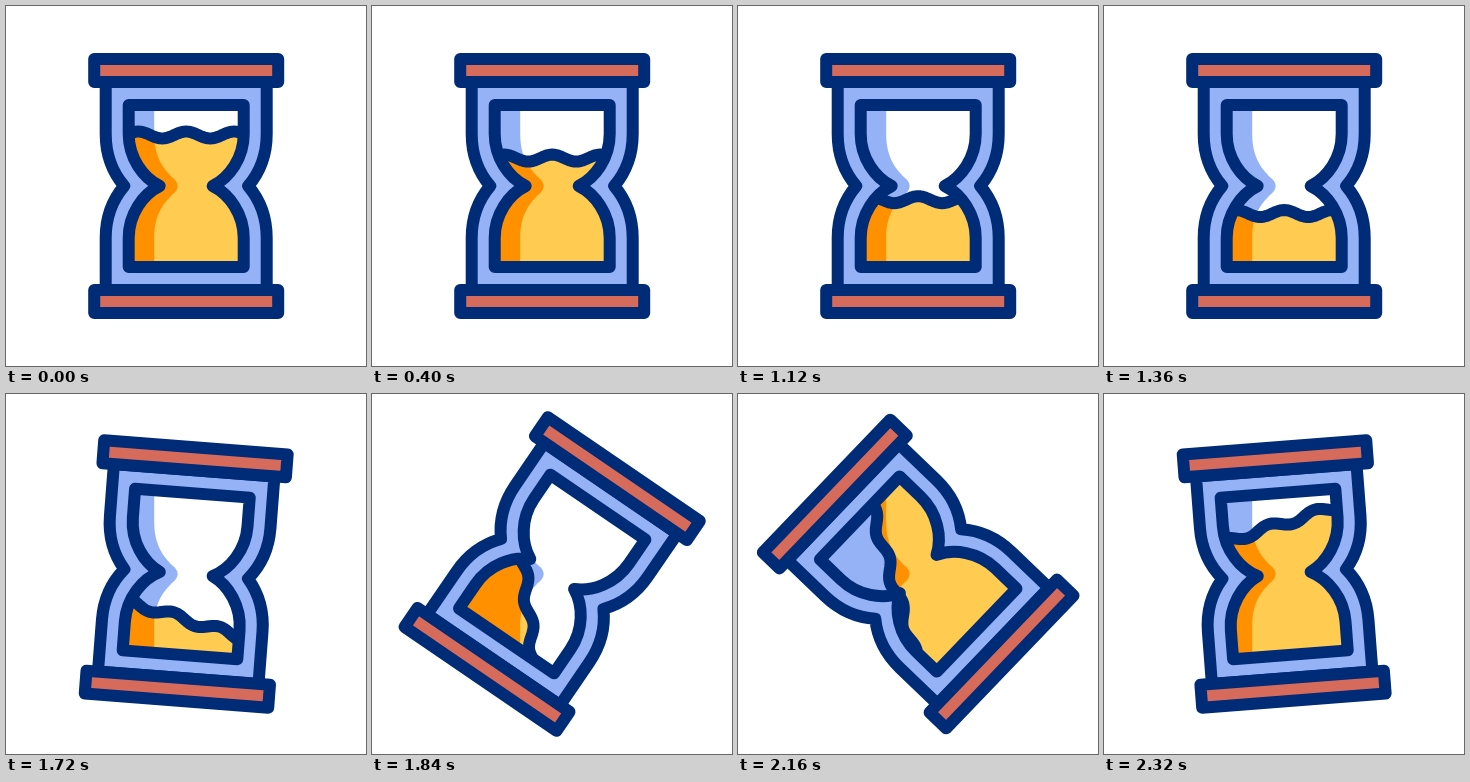
Write an HTML page with a canvas that moves like this. It is 360x360 px and loops after 2360 ms.

```html
<!DOCTYPE html>
<html lang="en">
<head>
<meta charset="utf-8">
<title>Hourglass</title>
<style>
  html, body { margin: 0; height: 100%; overflow: hidden; background: #fff; }
  canvas { display: block; }
</style>
</head>
<body>
<canvas id="stage" width="360" height="360"></canvas>
<script>
const ctx = document.getElementById('stage').getContext('2d');
const LOOP = 2360, FLOW = 1680, STEP = 40;
const NAVY = '#002b76', BLUE = '#94b2f5', RED = '#d66b5c', YELLOW = '#ffcb50', ORANGE = '#ff9100';
const FULL = -51, EMPTY = 46; // sand surface relative to the centre

// All shapes are centred on the origin.
const body = new Path2D(`M-80.5 -104V-52C-80.5 -30 -74 -14 -62 0C-74 14 -80.5 30 -80.5 52V104
  H80.5V52C80.5 30 74 14 62 0C74 -14 80.5 -30 80.5 -52V-104Z`);
const bulbs = new Path2D(`M-57.5 -81V-52C-57.5 -28 -43 -8 -26.5 0C-43 8 -57.5 28 -57.5 52V81
  H57.5V52C57.5 28 43 8 26.5 0C43 -8 57.5 -28 57.5 -52V-81Z`);
const shade = new Path2D(`M-200 -200H-32V-52C-32 -28 -22 -16 -11 -6Q-6 0 -11 6
  C-22 16 -32 28 -32 52V200H-200Z`);
const bars = new Path2D();
bars.rect(-92, -127, 184, 23);
bars.rect(-92, 104, 184, 23);

const wave = new Path2D();
for (let x = -168; x <= 168; x += 2) wave.lineTo(x, -3.5 * Math.cos(x * Math.PI / 24));
const sand = new Path2D(wave);
sand.lineTo(168, 300);
sand.lineTo(-168, 300);
sand.closePath();

// Timing curve cubic-bezier(.167, 0, .833, 1)
function ease(x) {
  let lo = 0, hi = 1;
  for (let i = 0; i < 24; i++) {
    const t = (lo + hi) / 2, u = 1 - t;
    if (.501 * u * u * t + 2.499 * u * t * t + t * t * t < x) lo = t; else hi = t;
  }
  return lo * lo * (3 - 2 * lo);
}

function fill(path, color) {
  ctx.fillStyle = color;
  ctx.fill(path);
}

function drawContents(turn, tilt, level) {
  ctx.save();
  ctx.rotate(turn);
  ctx.clip(bulbs);
  fill(bulbs, '#fff');
  ctx.rotate(-turn);
  fill(shade, BLUE); // the shade keeps still while the glass turns

  ctx.rotate(turn + tilt);
  ctx.translate(0, level);
  ctx.save();
  ctx.clip(sand);
  fill(sand, YELLOW);
  ctx.translate(0, -level);
  ctx.rotate(-turn - tilt);
  fill(shade, ORANGE);
  ctx.restore();
  ctx.stroke(wave);
  ctx.restore();
}

function draw(time) {
  const flow = Math.min(time / FLOW, 1);
  const p = Math.max(0, (time - FLOW) / (LOOP - FLOW));
  const flip = ease(p);
  const turn = Math.PI * flip;
  const tilt = Math.PI * (p + .04 * Math.sin(2 * Math.PI * p));
  const level = FULL + (EMPTY - FULL) * (flow - flip);

  ctx.setTransform(1, 0, 0, 1, 0, 0);
  ctx.fillStyle = '#fff';
  ctx.fillRect(0, 0, 360, 360);
  ctx.translate(180.2, 180);
  ctx.lineWidth = 12;
  ctx.lineJoin = ctx.lineCap = 'round';
  ctx.strokeStyle = NAVY;

  ctx.save();
  ctx.rotate(turn);
  fill(body, BLUE);
  ctx.stroke(body);
  ctx.restore();

  drawContents(turn, tilt, level);

  ctx.rotate(turn);
  ctx.stroke(bulbs);
  fill(bars, RED);
  ctx.stroke(bars);
}

function tick() {
  draw(Math.floor(performance.now() % LOOP / STEP) * STEP);
  requestAnimationFrame(tick);
}
tick();
</script>
</body>
</html>
```
